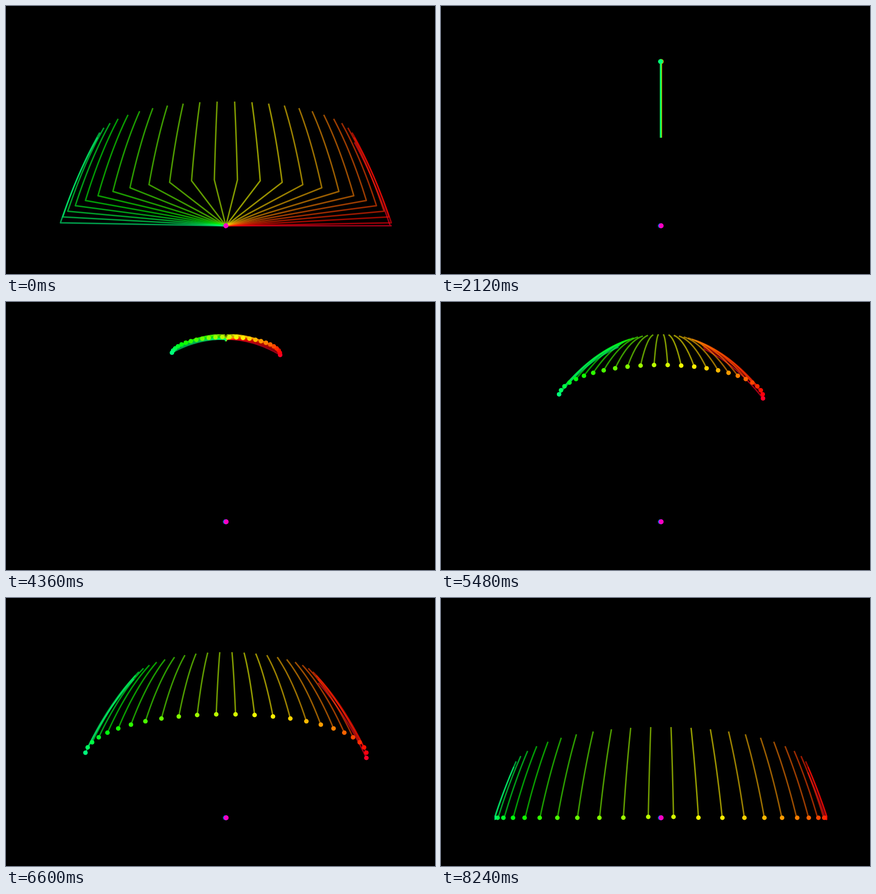
Recreate the animation shown at these times as an HTML page with a canvas. Size 947x592 px, loop 8.34 s.

```html
<!DOCTYPE html>
<html lang="en">
<head>
<meta charset="utf-8">
<title>Firework</title>
<style>
  html, body { margin: 0; width: 100%; height: 100%; overflow: hidden; background: #000; }
  canvas { display: block; width: 947px; height: 592px; }
</style>
</head>
<body>
<canvas id="sky" width="947" height="592"></canvas>
<script>
const ctx = document.getElementById('sky').getContext('2d');

const LOOP = 8340, LAST = 176, COUNT = 50, TRAIL = 29;
const CX = 485.4, GROUND = 485.5;
const AXES = [118.4, 71, 733.9, 455.9];
const DOT = 5, LINE = 3.2;

// Physics in pixels per step; RATIO is the vertical to horizontal axis scale.
const GRAVITY = 0.1234, RATIO = 0.341, DRAG = 0.00178 * RATIO;
const LAUNCH = 14.855, JITTER = 0.85;
const BURST = 71, BURST_SPEED = 5.25, BURST_SHIFT = 3.9, SINK = 0.2;
const LANDING = 162;

const RAINBOW = [
  [0, 255, 0, 41], [0.03, 255, 0, 0], [0.215, 255, 255, 0], [0.4, 0, 255, 0],
  [0.586, 0, 255, 255], [0.77, 0, 0, 255], [0.954, 255, 0, 255], [1, 255, 0, 191]
];

function rainbow(u) {
  const n = Math.max(1, RAINBOW.findIndex(stop => stop[0] >= u));
  const a = RAINBOW[n - 1], b = RAINBOW[n];
  const f = (u - a[0]) / (b[0] - a[0]);
  const rgb = [1, 2, 3].map(c => Math.round(a[c] + (b[c] - a[c]) * f));
  return `rgb(${rgb})`;
}

// Explicit Euler steps: rise, burst at the top, fall with quadratic drag.
function flight(angle) {
  const cos = Math.cos(angle), sin = Math.sin(angle);
  const path = [[CX, GROUND]];
  let x = JITTER * cos, y = GROUND, vx = 0, vy = -LAUNCH, landed = false;
  for (let n = 1; n <= LAST; n++) {
    if (!landed) {
      x += vx;
      y += vy;
      const drag = DRAG * Math.hypot(vx, vy / RATIO);
      vx -= drag * vx;
      vy += GRAVITY - drag * vy;
      if (n === BURST) {
        x = BURST_SHIFT * cos;
        vx = BURST_SPEED * cos;
        vy = SINK - BURST_SPEED * RATIO * sin;
      }
      if (y >= GROUND) {
        y = GROUND;
        landed = true;
      }
    }
    path.push([CX + x, y]);
  }
  return path;
}

const sparks = Array.from({ length: COUNT }, (_, k) => {
  const angle = 2 * Math.PI * k / COUNT;
  const flies = k < COUNT / 2;
  return {
    color: rainbow(k / (COUNT - 1)),
    path: flies ? flight(angle) : null,
    rest: [CX + JITTER * Math.cos(angle), GROUND]
  };
});

function trailOf(path, step) {
  if (step === 0) return [...path.slice(LANDING - TRAIL + 1, LANDING + 1), path[0]];
  return path.slice(Math.max(1, step - TRAIL), step + 1);
}

function headOf(spark, step) {
  if (step === 0) return [CX, GROUND];
  return spark.path ? spark.path[step] : spark.rest;
}

function draw(step) {
  ctx.fillStyle = '#000';
  ctx.fillRect(0, 0, 947, 592);
  ctx.save();
  ctx.beginPath();
  ctx.rect(...AXES);
  ctx.clip();

  ctx.lineWidth = LINE;
  ctx.lineCap = 'square';
  ctx.lineJoin = 'round';
  ctx.globalAlpha = 0.6;
  for (const spark of sparks) {
    if (!spark.path) continue;
    ctx.strokeStyle = spark.color;
    ctx.beginPath();
    trailOf(spark.path, step).forEach(p => ctx.lineTo(...p));
    ctx.stroke();
  }

  ctx.globalAlpha = 1;
  for (const spark of sparks) {
    ctx.fillStyle = spark.color;
    ctx.beginPath();
    ctx.arc(...headOf(spark, step), DOT, 0, 2 * Math.PI);
    ctx.fill();
  }
  ctx.restore();
}

// Steps last 20, 100 and 20 ms in turn.
function stepAt(ms) {
  const r = ms % 140;
  const part = r < 20 ? 0 : r < 120 ? 1 : 2;
  return Math.min(LAST, 3 * Math.floor(ms / 140) + part);
}

const start = performance.now();
let shown = -1;

function tick() {
  const step = stepAt((performance.now() - start) % LOOP);
  if (step !== shown) {
    shown = step;
    draw(step);
  }
  requestAnimationFrame(tick);
}
tick();
</script>
</body>
</html>
```
